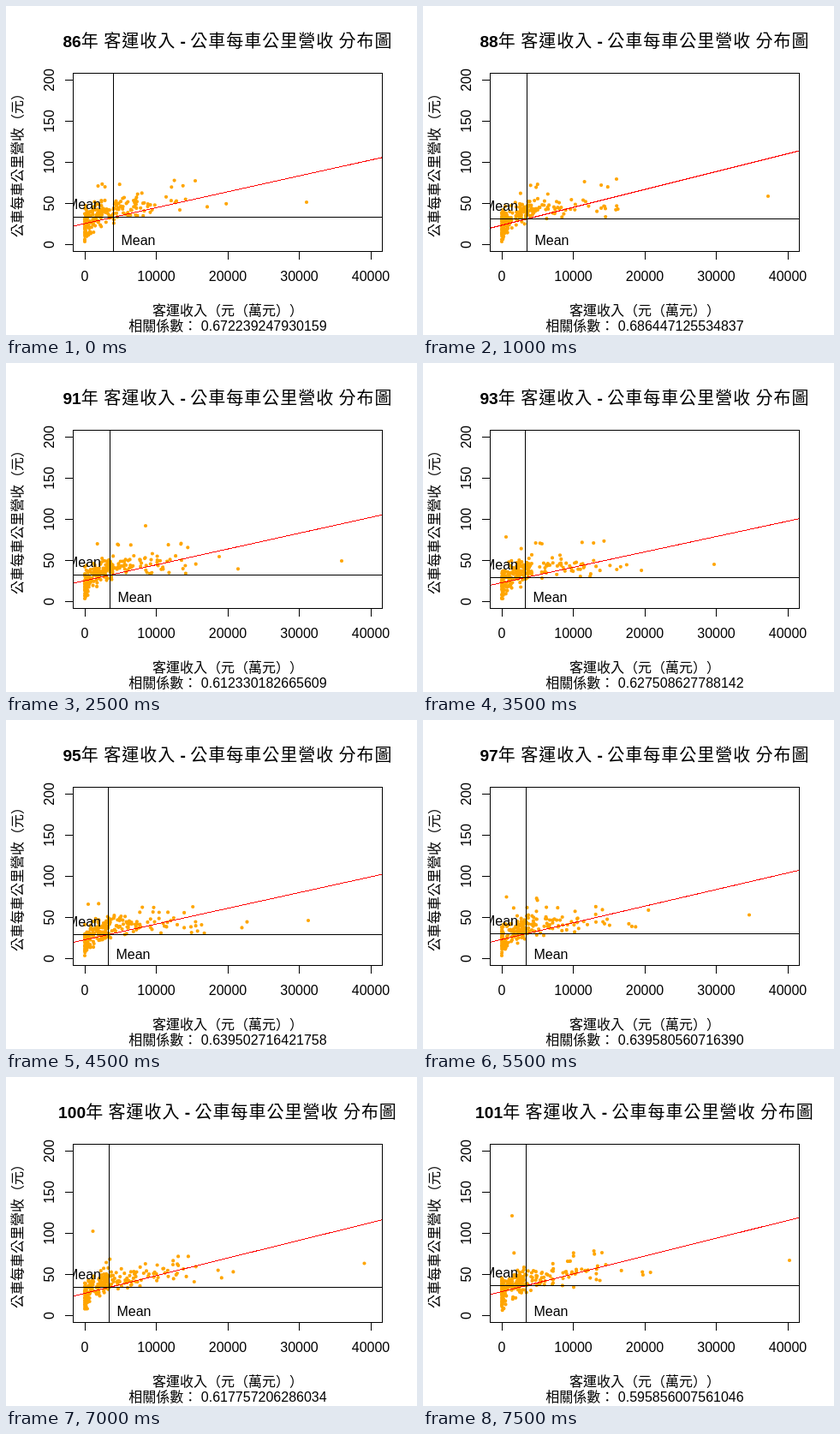
An HTML page for the animation above (8000 ms loop, 480 by 384 pixels).

```html
<!DOCTYPE html>
<html lang="zh-Hant">
<head>
<meta charset="utf-8">
<style>
  html, body { margin: 0; width: 100%; height: 100%; overflow: hidden; background: #fff; }
  svg { display: block; }
  text {
    font: 16px "Liberation Sans", Arial, "Noto Sans CJK TC", "Noto Sans CJK", sans-serif;
    font-feature-settings: "chws" 0, "halt" 0;
    text-spacing-trim: space-all;
    text-anchor: middle;
  }
  #title { font-weight: bold; font-size: 19.2px; }
  .han { font-weight: 500; font-size: 20px; letter-spacing: 1px; }
  .line { fill: none; stroke: #000; shape-rendering: crispEdges; }
  #trend { stroke: #f00; }
  #dots { fill: none; stroke: #ffa500; stroke-width: 4.2; stroke-linecap: round; }
</style>
</head>
<body>
<svg width="480" height="384" viewBox="0 0 480 384">
  <clipPath id="plot"><rect x="78" y="78" width="362" height="209"/></clipPath>
  <text id="title" x="259" y="48"><tspan id="year"></tspan><tspan class="han">年</tspan> <tspan class="han">客運收入</tspan> - <tspan class="han">公車每車公里營收</tspan> <tspan class="han">分布圖</tspan></text>
  <g clip-path="url(#plot)">
    <path id="dots"/>
    <path id="trend" class="line"/>
    <path id="means" class="line"/>
    <text id="meanX" y="279">Mean</text>
    <text id="meanY" x="91">Mean</text>
  </g>
  <rect class="line" x="78.5" y="78.5" width="361" height="208"/>
  <g id="axes"></g>
  <text x="259" y="361">客運收入（元（萬元））</text>
  <text transform="translate(19 182) rotate(-90)">公車每車公里營收（元）</text>
  <text id="corr" x="259" y="379"></text>
</svg>
<script>
const FIRST = 86, YEARS = 16, STEP = 500;
const $ = id => document.getElementById(id);

// Key years: correlation, mean point, trend slope, rightmost and highest dot; years between are blended
const keys = [
  { year: 86, r: 0.672239247930159, mean: [125, 246], slope: 0.222, far: [351, 229], high: [221, 204] },
  { year: 88, r: 0.686447125534837, mean: [121, 248], slope: 0.25, far: [403, 222], high: [226, 202] },
  { year: 91, r: 0.612330182665609, mean: [121, 247], slope: 0.221, far: [392, 231], high: [163, 190] },
  { year: 93, r: 0.627508627788142, mean: [119, 250], slope: 0.215, far: [340, 235], high: [97, 203] },
  { year: 95, r: 0.639502716421758, mean: [119, 250], slope: 0.22, far: [353, 234], high: [96, 215] },
  { year: 99, r: 0.639658405011022, mean: [120, 247], slope: 0.245, far: [409, 221], high: [99, 198] },
  { year: 101, r: 0.595856007561046, mean: [120, 243], slope: 0.249, far: [428, 214], high: [104, 162] }
];

const mix = (a, b, k) => Array.isArray(a) ? a.map((v, i) => mix(v, b[i], k)) : a + (b - a) * k;

function stateFor(year) {
  const next = keys.findIndex(key => key.year >= year);
  const b = keys[next], a = keys[Math.max(0, next - 1)];
  if (b.year === year) return b;
  const k = (year - a.year) / (b.year - a.year);
  return Object.fromEntries(Object.keys(a).map(name => [name, mix(a[name], b[name], k)]));
}

function seeded(seed) {
  return () => (seed = (seed * 16807) % 2147483647) / 2147483647;
}

// Dense strip near zero that levels off into a thinning tail
function cloud({ year, mean, far, high }) {
  const rand = seeded(year * 7919);
  let path = '';
  const dot = (x, y) => path += `M${x.toFixed(1)} ${y.toFixed(1)}h.01`;
  const scatter = x => {
    const d = x - 92, noise = rand() + rand() + rand() - 1.5;
    const mid = mean[1] + 11 - 21 * (1 - Math.exp(-d / 15)) - d * 0.02;
    dot(x, Math.min(275, mid + noise * (12 + 5 * Math.exp(-d / 15))));
  };
  for (let i = 0; i < 140; i++) scatter(92 + 32 * rand() ** 3);
  for (let i = 0; i < 95; i++) scatter(108 - 38 * Math.log(0.01 + 0.99 * rand()));
  for (let i = 0; i < 8; i++) dot(100 + 120 * rand(), mean[1] - 25 - 18 * rand());
  dot(...far);
  dot(...high);
  return path;
}

function drawAxes() {
  let html = '';
  for (let i = 0; i < 5; i++) {
    const x = 92 + 83.5 * i, y = 278.5 - 48 * i;
    html += `<path class="line" d="M${Math.floor(x) + 0.5} 287v9M69 ${y}h9"/>
      <text x="${x}" y="321">${i * 10000}</text>
      <text transform="translate(56 ${y}) rotate(-90)">${i * 50}</text>`;
  }
  $('axes').innerHTML = html;
}

function show(year) {
  const state = stateFor(year), [mx, my] = state.mean.map(v => Math.round(v) + 0.5);
  const trend = x => my - state.slope * (x - mx);
  $('year').textContent = year;
  $('corr').textContent = '相關係數： ' + state.r.toFixed(15);
  $('dots').setAttribute('d', cloud(state));
  $('trend').setAttribute('d', `M78 ${trend(78)}L440 ${trend(440)}`);
  $('means').setAttribute('d', `M${mx} 78V287M78 ${my}H440`);
  $('meanX').setAttribute('x', mx + 29);
  $('meanY').setAttribute('y', my - 9.5);
}

let shown;
const start = performance.now();
function tick() {
  const year = FIRST + Math.floor((performance.now() - start) / STEP) % YEARS;
  if (year !== shown) show(shown = year);
  requestAnimationFrame(tick);
}
drawAxes();
tick();
</script>
</body>
</html>
```
